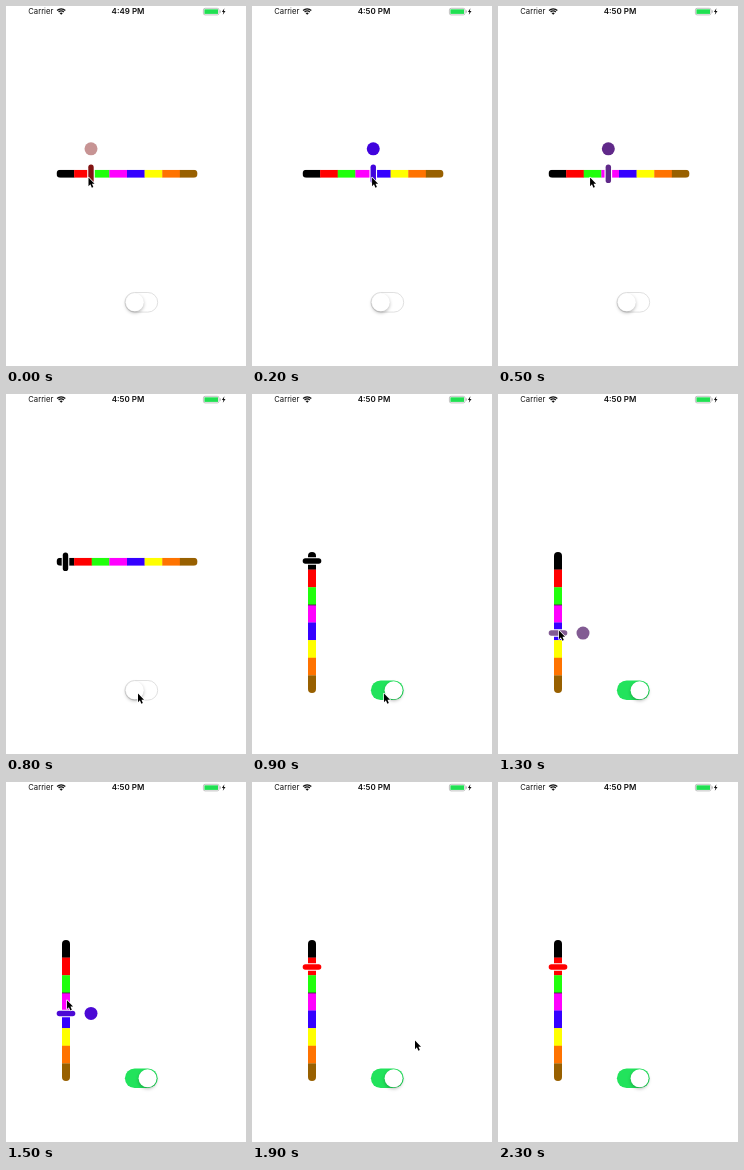
These frames come from a looping animation (240x360 px, 2.4 s). An HTML page with a canvas:

```html
<!DOCTYPE html>
<html lang="en">
<head>
<meta charset="utf-8">
<title>Color slider</title>
<style>
html, body { margin: 0; width: 100%; height: 100%; overflow: hidden; background: #fff; }
canvas { display: block; width: 240px; height: 360px; }
</style>
</head>
<body>
<canvas id="stage"></canvas>
<script>
const LOOP = 2400, STEP = 100;
const canvas = document.getElementById('stage');
const dpr = window.devicePixelRatio || 1;
canvas.width = 240 * dpr;
canvas.height = 360 * dpr;
const ctx = canvas.getContext('2d');

const palette = ['#000', '#f00', '#20ff0c', '#f0f', '#3500ff', '#ff0', '#ff7300', '#986000'];
const LENGTH = 141, SEGMENT = LENGTH / palette.length;

// Each drag swings out along the bar and back; the pointer leads the thumb.
const across = { start: 0, from: 34.5, to: 9, swing: 55.7, lead: .2, grip: 2.5, fade: .45,
  colors: [[130, 18, 18], [53, 0, 255], [112, 48, 160], [0, 0, 0]] };
const down = { start: 1000, from: 9, to: 27, swing: 66, lead: .14, grip: 4, fade: .85,
  colors: [[0, 40, 0], [80, 170, 15], [150, 60, 200], [62, 0, 215], [255, 0, 0]] };
const DRAG = 700;
const togglePoint = [132, 299.5], restPoint = [163, 258.5];

const clamp = v => Math.min(1, Math.max(0, v));
const lerp = (a, b, p) => a + (b - a) * p;
const mix = (a, b, p) => a.map((v, i) => lerp(v, b[i], p));
const progress = (drag, t) => clamp((t - drag.start) / DRAG);
const swing = (drag, p) => lerp(drag.from, drag.to, p) + drag.swing * Math.sin(Math.PI * p);

function thumbColor(drag, p) {
  const last = drag.colors.length - 1;
  const i = Math.min(last - 1, Math.floor(p * last));
  return 'rgb(' + mix(drag.colors[i], drag.colors[i + 1], p * last - i).map(Math.round).join(',') + ')';
}

function pointer(drag, t) {
  const p = progress(drag, t);
  const pos = swing(drag, clamp(p + drag.lead * p * p)) - drag.grip;
  return drag === down ? [61, 158 + pos] : [50.5 + pos, 171.5];
}

function cursorPoint(t) {
  if (t < 800) return mix(pointer(across, t), togglePoint, clamp((t - 700) / 100));
  if (t < 1700) return mix(togglePoint, pointer(down, t), clamp((t - 900) / 100));
  return mix(pointer(down, t), restPoint, clamp((t - 1700) / 200));
}

function pill(x, y, w, h, fill) {
  ctx.beginPath();
  ctx.roundRect(x, y, w, h, Math.min(w, h) / 2);
  ctx.fillStyle = fill;
  ctx.fill();
}

function disc(x, y, r, fill) {
  ctx.beginPath();
  ctx.arc(x, y, r, 0, Math.PI * 2);
  ctx.fillStyle = fill;
  ctx.fill();
}

function polygon(points) {
  ctx.beginPath();
  points.forEach(([x, y]) => ctx.lineTo(x, y));
  ctx.closePath();
}

function statusBar(t) {
  ctx.fillStyle = '#111';
  ctx.textAlign = 'left';
  ctx.font = '7.7px Inter, "Liberation Sans", sans-serif';
  ctx.fillText('Carrier', 22.2, 8.3);
  ctx.textAlign = 'center';
  ctx.font = '600 8px Inter, "Liberation Sans", sans-serif';
  ctx.fillText(t < 200 ? '4:49 PM' : '4:50 PM', 122, 8.3);

  ctx.strokeStyle = '#111';
  ctx.lineWidth = 1.3;
  for (const r of [3.7, 5.8]) {
    ctx.beginPath();
    ctx.arc(55.2, 8.6, r, -Math.PI * .75, -Math.PI * .25);
    ctx.stroke();
  }
  ctx.beginPath();
  ctx.moveTo(55.2, 8.8);
  ctx.arc(55.2, 8.8, 2.2, -Math.PI * .75, -Math.PI * .25);
  ctx.fill();

  ctx.strokeStyle = '#aaa';
  ctx.lineWidth = .7;
  ctx.beginPath();
  ctx.roundRect(197.4, 2.3, 15.6, 6.6, 1.7);
  ctx.stroke();
  ctx.fillStyle = '#20e052';
  ctx.fillRect(198.4, 3.3, 13.6, 4.6);
  pill(213.7, 4.3, 1, 2.5, '#aaa');
  polygon([[218.4, 2.2], [215.9, 6], [217.4, 6], [216.8, 8.8], [219.5, 4.9], [217.9, 4.9]]);
  ctx.fillStyle = '#111';
  ctx.fill();
}

function slider(t, vertical) {
  const drag = vertical ? down : across;
  const p = progress(drag, t);
  const pos = swing(drag, p), color = p > 0 || !vertical ? thumbColor(drag, p) : '#000';
  const place = (along, off, w, h) =>
    vertical ? [60 + off, 158 + along, h, w] : [50.5 + along, 167.8 + off, w, h];

  ctx.save();
  ctx.beginPath();
  ctx.roundRect(...place(0, -4, LENGTH, 8), 4);
  ctx.clip();
  palette.forEach((fill, i) => {
    ctx.fillStyle = fill;
    ctx.fillRect(...place(i * SEGMENT, -4, SEGMENT + .2, 8));
  });
  if (vertical) {
    ctx.fillStyle = '#333';
    ctx.fillRect(...place(SEGMENT * 3 - .3, -4, .8, 8));
  }
  ctx.restore();

  pill(...place(pos - 3.8, -10, 7.6, 20), '#fff');
  pill(...place(pos - 2.7, -9.3, 5.4, 18.6), color);

  const held = t >= drag.start + (vertical ? STEP : 0) && p < 1;
  if (held) {
    ctx.globalAlpha = p < .2 && t - drag.start <= (vertical ? STEP : 0) ? drag.fade : 1;
    const [x, y] = place(pos, vertical ? 25 : -25, 0, 0);
    disc(x, y, 6.5, color);
    ctx.globalAlpha = 1;
  }
}

function toggle(on) {
  pill(118.9, 286.5, 32.8, 19.6, on ? '#22e35c' : '#fff');
  if (!on) {
    ctx.strokeStyle = '#ddd';
    ctx.lineWidth = .9;
    ctx.stroke();
  }
  ctx.save();
  ctx.shadowColor = 'rgba(0,0,0,.28)';
  ctx.shadowBlur = 3.5 * dpr;
  ctx.shadowOffsetY = 1.6 * dpr;
  disc(on ? 141.6 : 128.8, 296.3, 9, '#fff');
  ctx.restore();
}

function cursor(x, y) {
  ctx.save();
  ctx.translate(x, y);
  ctx.scale(.86, .9);
  polygon([[0, 0], [0, 9.6], [2.2, 7.6], [3.9, 11.3], [5.6, 10.5], [4, 7], [7, 7]]);
  ctx.lineJoin = 'round';
  ctx.strokeStyle = '#fff';
  ctx.lineWidth = 1.6;
  ctx.stroke();
  ctx.fillStyle = '#000';
  ctx.fill();
  ctx.restore();
}

function draw(now) {
  // The picture advances ten times a second.
  const t = Math.floor((now % LOOP) / STEP) * STEP;
  const on = t >= 900;
  ctx.setTransform(dpr, 0, 0, dpr, 0, 0);
  ctx.fillStyle = '#fff';
  ctx.fillRect(0, 0, 240, 360);
  statusBar(t);
  slider(t, on);
  toggle(on);
  if (t < 2100) cursor(...cursorPoint(t));
}

const start = performance.now();
function tick() {
  draw(performance.now() - start);
  requestAnimationFrame(tick);
}
tick();
</script>
</body>
</html>
```
